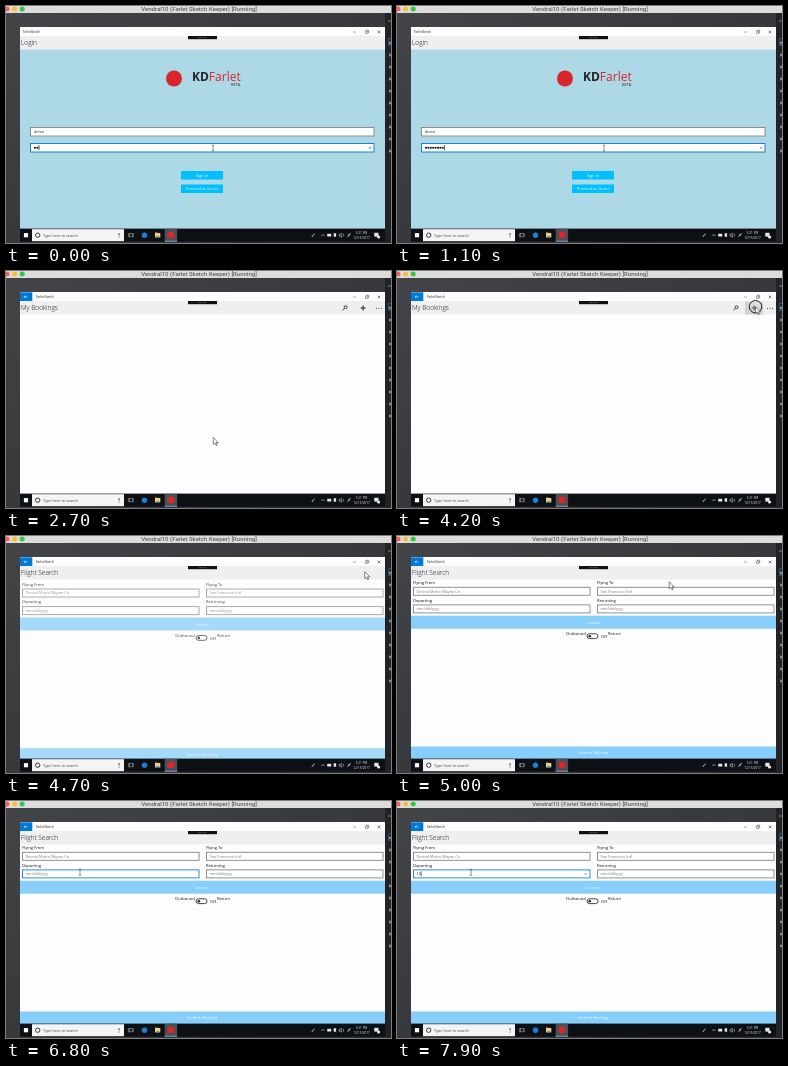
An HTML page that plays this animation: 385x237 px, repeating every 8000 ms.

```html
<!DOCTYPE html>
<html lang="en">
<head>
<meta charset="utf-8">
<title>Booking demo</title>
<style>
html, body { margin: 0; width: 100%; height: 100%; overflow: hidden; background: #303134; }
svg { display: block; width: 385px; height: 237px; }
text { font-family: "Open Sans", "Noto Sans", sans-serif; white-space: pre; }
.mac { font-family: Roboto, "Liberation Sans", sans-serif; }
.head { font-weight: 300; }
</style>
</head>
<body>
<svg id="stage" viewBox="0 0 385 237" xmlns="http://www.w3.org/2000/svg"></svg>
<script>
const LOOP = 8000;
const T = { bookings: 2400, search: 4500, focus: 5750 };
const LEFT = 14, WIDE = 365;

const rect = (x, y, w, h, fill, more = '') =>
  `<rect x="${x}" y="${y}" width="${w}" height="${h}" fill="${fill}" ${more}/>`;
const band = (y, h, fill) => rect(LEFT, y, WIDE, h, fill);
const dot = (x, y, r, fill, more = '') =>
  `<circle cx="${x}" cy="${y}" r="${r}" fill="${fill}" ${more}/>`;
const line = (d, color, w = 0.7, more = '') =>
  `<path d="${d}" fill="none" stroke="${color}" stroke-width="${w}" ${more}/>`;
// y is the middle of the capitals
const label = (x, y, size, fill, str, more = '') =>
  `<text x="${x}" y="${y + size * 0.36}" font-size="${size}" fill="${fill}" ${more}>${str}</text>`;
const heading = str => label(15, 37, 6.5, '#111', str, 'class="head"');
const mid = 'text-anchor="middle"';
const group = (id, body) => `<g id="${id}">${body}</g>`;
const field = (x, y, w, h, id = '') =>
  rect(x, y, w, h, '#fff', `stroke="#858585" stroke-width=".9" ${id && `id="${id}"`}`);
const cross = (x, y, r, color) =>
  line(`M${x - r} ${y - r}l${2 * r} ${2 * r}m0 ${-2 * r}l${-2 * r} ${2 * r}`, color, 0.6);

function desktop() {
  let s = `<defs><linearGradient id="wall" x1="0" y1="0" x2="1" y2="1">
    <stop offset="0" stop-color="#444548"/><stop offset="1" stop-color="#2b2c2f"/></linearGradient></defs>`;
  s += rect(0, 0, 385, 237, 'url(#wall)') + rect(0, 0, 385, 7, '#dddcdd');
  ['#f95f57', '#fabd2f', '#31c748'].forEach((c, i) => s += dot(1 + i * 7.6, 3, 2.5, c));
  s += label(193, 3, 6.1, '#424242', 'Vendral10 (Farlet Sketch Keeper) [Running]', mid + ' class="mac"');
  s += rect(379, 7, 6, 230, '#222327');
  s += line('M385 32.5h-2.5v7h2.5', '#2f5f9e', 0.8);
  for (let y = 37; y < 150; y += 12)
    s += line(`M383 ${y}h2m-1 -1.5v3`, '#bfc1c4', 0.8);
  return s + line('M382 15h3', '#999', 0.8);
}

function frame() {
  return band(21, 202, '#fdfdfd') + band(30, 13.5, '#efefef') +
    line('M347 26h3', '#555', 0.5) + line('M359.5 25h2.4v2.4h-2.4zM360.5 25v-.8h2.2v2.4h-.8', '#444', 0.5) +
    cross(373, 26, 1.3, '#333');
}

function login() {
  let s = label(17, 26, 3, '#222', 'FarletSketch') + heading('Login');
  s += band(43.5, 179.5, '#add8e6');
  s += dot(168, 72.5, 8, '#d9252c');
  s += `<text x="186" y="75" font-size="12" font-weight="700" fill="#242424">KD<tspan font-weight="400" fill="#d9252c">Farlet</tspan></text>`;
  s += label(225, 79, 4, '#333', 'BETA');
  s += field(24.5, 121.5, 343.5, 8.5) + label(28, 125.8, 3.8, '#222', 'demo');
  s += rect(24.5, 137.5, 343.5, 8.5, '#fff', 'stroke="#2080cc"') + cross(364, 141.7, 1, '#555');
  s += group('dots', Array.from({ length: 8 }, (_, i) => dot(29 + i * 2.4, 141.8, 1.05, '#111')).join(''));
  s += line('M0 139.2v5', '#111', 0.7, 'id="caret"');
  s += rect(175, 165, 42, 8.5, '#00bfff') + label(196, 169.3, 4, '#eaf9ff', 'Sign In', mid + ' id="sign"');
  s += rect(175, 165, 42, 8.5, 'none', 'id="press" stroke="#111" stroke-width="1" stroke-dasharray="1.3 .7"');
  s += rect(175, 178.5, 42, 8.5, '#00bfff') + label(196, 182.7, 4, '#eaf9ff', 'Proceed as Guest', mid);
  return s;
}

function backBar() {
  return rect(LEFT, 21.3, 12.3, 8.7, '#0078d7') +
    line('M21.5 25.8h-3.4m1.3 -1.3l-1.3 1.3l1.3 1.3', '#fff', 0.55) +
    label(30, 26, 3.1, '#222', 'FarletSketch');
}

function bookings() {
  return heading('My Bookings') +
    rect(348, 30.5, 18, 13, '#d2d2d2', 'id="hover"') +
    dot(339.6, 36.2, 1.5, 'none', 'stroke="#222" stroke-width=".8"') + line('M338.5 37.4l-2 2', '#222', 0.9) +
    line('M354.5 37h5.2m-2.6 -2.6v5.2', '#222', 1.1) +
    [370.5, 373, 375.5].map(x => dot(x, 37.2, 0.55, '#333')).join('');
}

function search() {
  const hint = (x, y, str, id = '') => label(x, y, 3.9, '#777', str, id);
  const bar = (y, h, str) => band(y, h, '#87cefa') + label(196, y + h / 2 + 0.2, 3.9, '#f0f9ff', str, mid);
  let s = '';
  [[16, 'Flying From', 'Departing', 'Detroit Metro Wayne Co'],
   [200, 'Flying To', 'Returning', 'San Francisco Intl']].forEach(([x, a, b, place], i) => {
    s += label(x, 46.5, 4.1, '#111', a) + label(x, 64.2, 4.1, '#111', b);
    s += field(x + 0.5, 51.3, 176.5, 8) + hint(x + 3.5, 55.3, place);
    s += field(x + 0.5, 68.9, 176.5, 8, i ? '' : 'depart');
    s += hint(x + 3.5, 72.9, 'mm/dd/yyyy', i ? '' : 'id="hint"');
  });
  s += label(19.5, 72.9, 3.9, '#222', '', 'id="date"') + line('M0 70.4v5', '#111', 0.6, 'id="dateCaret"');
  s += group('clear', cross(188.5, 72.9, 0.9, '#777'));
  s += bar(79.7, 13, 'Lookup');
  s += label(169, 98, 4.1, '#111', 'Outbound') + label(211, 98, 4.1, '#111', 'Return');
  s += rect(190, 97.8, 11, 4.8, '#fff', 'rx="2.4" stroke="#333" stroke-width=".9"') + dot(192.8, 100.2, 1.3, '#222');
  s += label(204, 100.4, 4.1, '#111', 'Off');
  return s + bar(210.5, 12.5, 'Confirm Booking');
}

function taskbar() {
  const w = '#e8e8e8';
  let s = rect(182, 30, 29, 3.2, '#111') + line('M192 31.6h9', '#777', 0.6, 'stroke-dasharray="1.2 .5"');
  s += band(222.6, 13.1, '#0d1014');
  s += rect(17.9, 227.1, 4.2, 4.2, '#fff');
  s += rect(26, 223.2, 92, 12, '#f4f4f4') + dot(31.7, 229.2, 2.2, 'none', 'stroke="#111" stroke-width=".8"');
  s += label(37, 229.3, 3.8, '#444', 'Type here to search');
  s += rect(112.5, 227, 1.2, 2.6, '#666', 'rx=".6"') + line('M113.1 229.8v1.6m-.9 0h1.8', '#777', 0.4);
  s += rect(123.6, 227.5, 2.6, 3.4, 'none', `stroke="#bbb" stroke-width=".5"`) + line('M122.4 227.2v4m5 -4v4', '#bbb', 0.5);
  s += dot(138.5, 229.2, 2.7, '#1d80d8');
  s += rect(149, 227, 5.3, 4.4, '#f3d27b') + rect(149, 226.5, 2.5, 1, '#dfb64f') + rect(150.2, 229.9, 3, 1.5, '#4b9bd2');
  s += rect(158.7, 222.8, 12.4, 12.8, '#4a5056') + dot(165, 229, 3.6, '#d9252c') + rect(158.7, 234.8, 12.4, 0.8, '#76b9ed');
  s += line('M305.8 231l2.6 -3.3', w, 0.8) + line('M315.3 230l1.6 -1.6l1.6 1.6', w, 0.6);
  s += rect(321.2, 227.8, 4, 2.7, w) + rect(327.7, 227.3, 2.4, 3.4, w);
  s += line('M333 228.5h1l1.3 -1.2v4l-1.3 -1.2h-1zm4 -.8q1.3 1.6 0 3.2', w, 0.5);
  s += line('M341.5 231l3.2 -4m-2.5 1l1.5 1.5', w, 0.7);
  s += label(355.5, 226.7, 3.1, w, '5:21 PM', mid) + label(355.5, 231.8, 3.1, w, '12/15/2017', mid);
  return s + rect(368.3, 226.8, 4.2, 3.8, w) + dot(372.6, 231, 1.6, w);
}

function pointer() {
  return group('ring', dot(0, 0, 6.2, 'rgba(255,255,255,.25)', 'stroke="#1c1c1c" stroke-width="1"')) +
    `<path id="arrow" d="M0 0V7L1.6 5.5L2.8 8L3.9 7.5L2.8 5.1H5Z" fill="#fff" stroke="#333" stroke-width=".6"/>` +
    line('M-1.3 -3h1l.3 .4l.3 -.4h1M0 -2.6v5.2M-1.3 3h1l.3 -.4l.3 .4h1', '#333', 0.55, 'id="beam"');
}

document.getElementById('stage').innerHTML =
  desktop() + frame() + group('login', login()) + group('back', backBar()) +
  group('bookings', bookings()) +
  group('search', heading('Flight Search') + group('form', search())) +
  taskbar() + group('pointer', pointer());

const el = id => document.getElementById(id);
const show = (id, on) => el(id).style.display = on ? '' : 'none';
const within = (t, a, b) => t >= a && t < b;
const clamp = v => Math.max(0, Math.min(1, v));

const path = [
  [0, 207, 142], [1300, 207, 142], [1900, 208.5, 167], [2300, 208.5, 167], [2600, 207.3, 166.5],
  [3000, 207.3, 166.5], [3900, 358.4, 35.7], [4800, 358.8, 35.7],
  [5350, 73, 68.7], [5700, 73, 68.7], [6100, 74, 71.3], [LOOP, 74, 71.3]
];

function place(t) {
  const i = path.findIndex(p => p[0] > t);
  const [a, x, y] = path[i - 1], [b, u, v] = path[i];
  let k = (t - a) / (b - a);
  k *= k * (3 - 2 * k);
  return [x + (u - x) * k, y + (v - y) * k];
}

function draw(t) {
  const [x, y] = place(t);
  const onLogin = t < T.bookings, onSearch = t >= T.search, focused = t >= T.focus;
  show('login', onLogin);
  show('back', !onLogin);
  show('bookings', !onLogin && !onSearch);
  show('search', onSearch);

  const n = Math.min(8, 2 + Math.floor(t / 160));
  [...el('dots').children].forEach((c, i) => c.style.display = i < n ? '' : 'none');
  el('caret').setAttribute('transform', `translate(${28.2 + n * 2.4})`);
  const pressed = t >= 1950;
  show('press', pressed);
  el('sign').setAttribute('fill', pressed ? '#08293a' : '#eaf9ff');
  show('hover', x > 348 && y < 44);

  // the form fades in while it slides up into place
  const rest = 1 - clamp((t - T.search) / 400);
  el('form').setAttribute('opacity', 1 - rest * rest);
  el('form').setAttribute('transform', `translate(0 ${14 * rest ** 3})`);

  const date = t < 7000 ? '' : t < 7400 ? '1' : '12';
  const over = t >= 5250;
  el('depart').setAttribute('stroke', focused ? '#1680d0' : over ? '#333' : '#858585');
  show('hint', !date);
  el('date').textContent = date;
  show('clear', date);
  show('dateCaret', focused && (date || Math.floor(t / 500) % 2 === 0));
  el('dateCaret').setAttribute('transform', `translate(${19.6 + date.length * 2.25})`);

  const beam = (onLogin && y < 147) || focused;
  show('beam', beam);
  show('arrow', !beam);
  show('ring', within(t, 4050, 4450) || within(t, 5350, T.focus));
  el('pointer').setAttribute('transform', `translate(${x} ${y})`);
}

const start = performance.now();
function tick(now) {
  draw(Math.max(0, now - start) % LOOP);
  requestAnimationFrame(tick);
}
draw(0);
requestAnimationFrame(tick);
</script>
</body>
</html>
```
